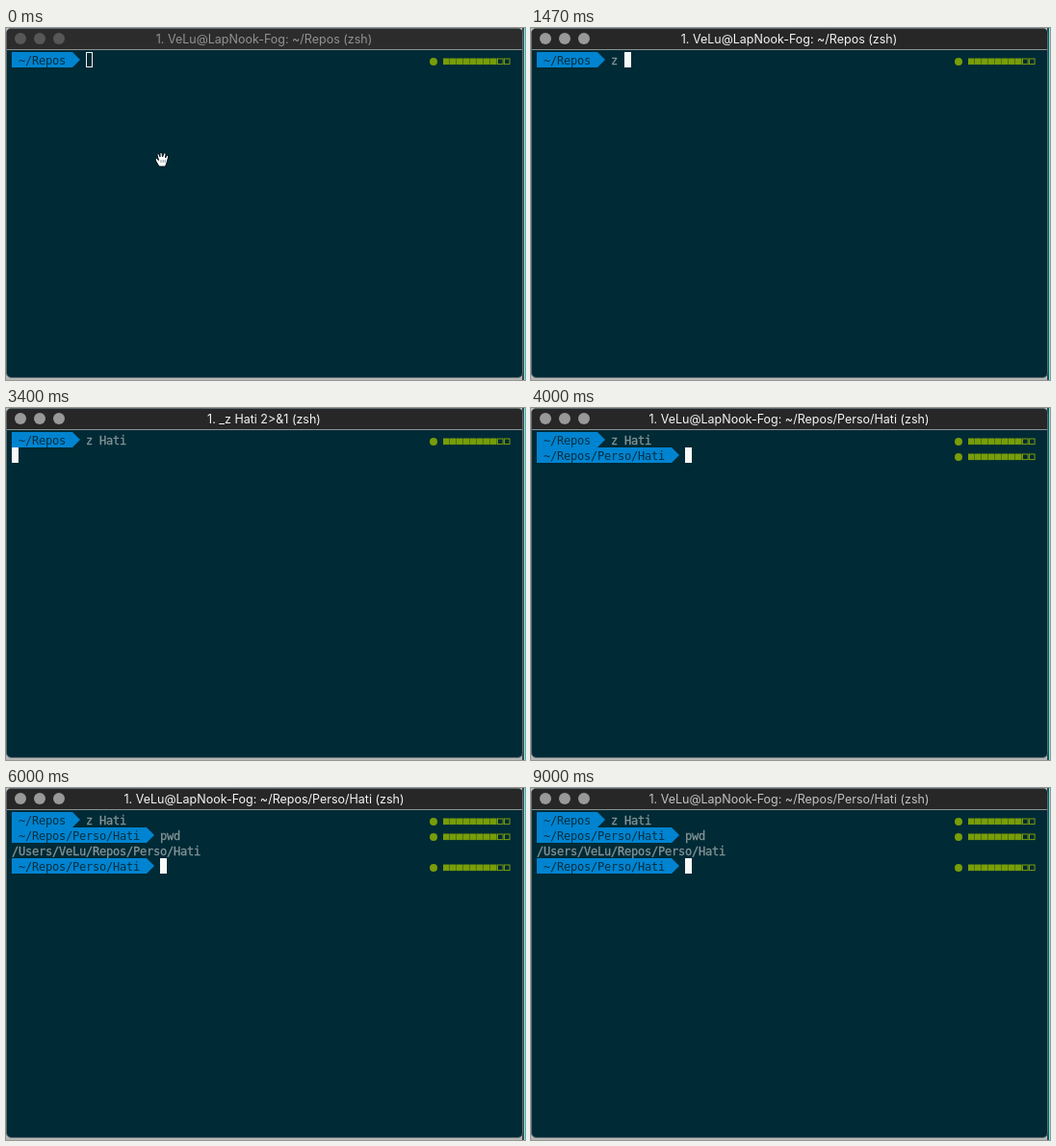
An HTML page that plays this animation: 539x366 px, repeating every 9190 ms.

```html
<!DOCTYPE html>
<html lang="en">
<head>
<meta charset="utf-8">
<title>Terminal</title>
<style>
html, body { margin: 0; width: 100%; height: 100%; overflow: hidden; background: #b4b6b6; }
svg { display: block; width: 100%; height: 100%; }
text { white-space: pre; }
.mono { font: 12px "DejaVu Sans Mono", monospace; letter-spacing: -0.224px; }
.plain { fill: #839496; stroke: #839496; stroke-width: 0.3; }
.title { font: 12.5px Inter, sans-serif; text-anchor: middle; }
</style>
</head>
<body>
<svg id="stage" viewBox="0 0 539 366"></svg>
<script>
const LOOP = 9190;
const CELL = 7, LINE = 16, LEFT = 6, TOP = 25;
const USER = 'VeLu', HOST = 'LapNook-Fog';
const HOME = '~/Repos', PROJECT = '~/Repos/Perso/Hati';
const stage = document.getElementById('stage');

function add(tag, attrs, parent = stage) {
  const el = document.createElementNS('http://www.w3.org/2000/svg', tag);
  set(el, attrs);
  parent.appendChild(el);
  return el;
}
function set(el, attrs) {
  for (const key in attrs) el.setAttribute(key, attrs[key]);
}
function show(el, on) {
  el.style.display = on ? '' : 'none';
}
const colX = col => LEFT + col * CELL;
const rowY = row => TOP + row * LINE;

function write(col, row, content, cls, fill) {
  const el = add('text', { x: colX(col), y: rowY(row) + 13, class: 'mono ' + cls });
  if (fill) el.setAttribute('fill', fill);
  el.textContent = content;
  return el;
}

// Window frame
add('rect', { x: 536, y: 0, width: 3, height: 366, fill: '#39474b' });
add('rect', { x: 538, y: 0, width: 1, height: 366, fill: '#5ff4f4' });
add('rect', { x: 0.5, y: 0.5, width: 536, height: 363, rx: 5, fill: '#002a35', stroke: '#59686c' });
const bar = add('path', { d: 'M1 22V5Q1 1 5 1H532Q536 1 536 5V22Z' });
add('rect', { x: 1, y: 22, width: 535, height: 1, fill: '#8b9393' });
const buttons = [15, 35, 55].map(cx => add('circle', { cx, cy: 11, r: 6 }));
const title = add('text', { x: 268, y: 16, class: 'title' });

function prompt(row, path) {
  const g = add('g', {});
  const y = rowY(row), end = colX(path.length + 2);
  add('path', { d: `M${LEFT} ${y}H${end}L${end + 8} ${y + 8}L${end} ${y + 16}H${LEFT}Z`, fill: '#0084d1' }, g);
  g.appendChild(write(1, row, path, '', '#002f3f'));
  add('circle', { cx: 444, cy: y + 10, r: 4, fill: '#789d08' }, g);
  for (let i = 0; i < 10; i++) {
    add('rect', {
      x: 454.5 + i * CELL, y: y + 7, width: 5.6, height: 5.6,
      fill: i < 8 ? '#789d08' : 'none', stroke: '#789d08'
    }, g);
  }
  return g;
}

const lines = [
  { at: 0, el: prompt(0, HOME) },
  { at: 3600, el: prompt(1, PROJECT) },
  { at: 5070, el: write(0, 2, `/Users/${USER}/Repos/Perso/Hati`, 'plain') },
  { at: 5200, el: prompt(3, PROJECT) }
];

function command(row, path, content, times) {
  const col = path.length + 4;
  return { row, col, content, times, el: write(col, row, '', 'plain') };
}
const commands = [
  command(0, HOME, 'z Hati', [1270, 1470, 1870, 2530, 2670, 2800]),
  command(1, PROJECT, 'pwd', [4400, 4670, 4800])
];
const caret = add('rect', {});

// Mouse pointers, drawn around their centre
const beam = add('g', { fill: 'none', 'stroke-linecap': 'round' });
for (const [stroke, width] of [['#001a21', 2.4], ['#fff', 1.1]]) {
  add('path', { d: 'M-3 -7Q0 -7 0 -5V5Q0 7 -3 7M3 -7Q0 -7 0 -5M0 5Q0 7 3 7M-1.5 2H1.5', stroke, 'stroke-width': width }, beam);
}
const arrow = add('path', {
  d: 'M0 -7V6L3 3L5 8L7 7L5 2.5H9Z', fill: '#000', stroke: '#fff'
});
const hand = add('g', { transform: 'translate(162 136)', 'stroke-linejoin': 'round' });
add('path', {
  d: 'M-3 8L-6.5 2Q-7.5 -.5 -5.5 -.5L-3.5 1.5L-5 -4Q-5 -6 -3.5 -5.5L-2 -2L-2 -6Q-1.2 -8 0 -6L.6 -2L2 -6Q3.5 -7 4 -5L3.5 -1L5.2 -3.5Q7 -4 6.6 -2L5 4L3.5 8Z',
  fill: '#fff', stroke: '#001216', 'stroke-width': 1
}, hand);
add('path', { d: 'M-1 4V1M1.2 4V1M3.2 4V1', stroke: '#456', 'stroke-width': 0.6 }, hand);

const pathTitle = path => `1. ${USER}@${HOST}: ${path} (zsh)`;
const titles = [
  [0, pathTitle(HOME)],
  [3400, '1. _z Hati 2>&1 (zsh)'],
  [3530, `1. ${USER}@${HOST}: ${PROJECT} (zsh)`],
  [5000, '1. pwd (zsh)'],
  [5130, pathTitle(PROJECT)]
];
const titleInk = [[0, '#929292'], [130, '#f4f4f4'], [8670, '#dcdcdc'], [8730, '#c2c2c2']];
const home = HOME.length + 4, project = PROJECT.length + 4;
// Caret positions: time, column, row
const carets = [
  [0, home, 0], [3400, 0, 1], [3600, project, 1],
  [5000, 0, 2], [5070, 0, 3], [5200, project, 3]
];
const latest = (list, t) => list.filter(item => item[0] <= t).pop();

function pointerAt(t) {
  if (t < 1200) return [162, 136];
  const step = Math.floor((t - 7600 + 1) * 15 / 1000);
  const p = Math.min(1, Math.max(0, step / 9));
  const u = p * p * (3 - 2 * p), v = 1 - u;
  const curve = (a, b, c, d) => v * v * v * a + 3 * v * v * u * b + 3 * v * u * u * c + u * u * u * d;
  return [curve(182, 200, 330, 355), curve(140, 300, 250, -8)];
}

function render(t) {
  const focused = t >= 130;
  set(bar, { fill: focused ? '#272727' : '#2c2c2c' });
  buttons.forEach(b => set(b, { fill: focused ? '#999' : '#575757' }));
  title.textContent = latest(titles, t)[1];
  set(title, { fill: latest(titleInk, t)[1] });

  lines.forEach(line => show(line.el, t >= line.at));
  let [, col, row] = latest(carets, t);
  for (const c of commands) {
    const count = c.times.filter(at => at <= t).length;
    c.el.textContent = c.content.slice(0, count);
    if (c.row === row && c.col === col) col += count;
  }
  const inset = focused ? 0 : 0.5;
  set(caret, {
    x: colX(col) + inset, y: rowY(row) + inset,
    width: CELL - 2 * inset, height: LINE - 2 * inset,
    fill: focused ? '#f8f9f9' : 'none', stroke: focused ? 'none' : '#f0f3f3'
  });

  const [x, y] = pointerAt(t);
  const moving = t >= 7600 && t < 8270;
  const place = { transform: `translate(${x} ${y})` };
  set(beam, place);
  set(arrow, place);
  show(hand, t < 200);
  show(beam, (t >= 200 && t < 1200) || (moving && y > 22));
  show(arrow, moving && y <= 22);
}

const start = performance.now();
function tick() {
  render((performance.now() - start) % LOOP);
  requestAnimationFrame(tick);
}
tick();
</script>
</body>
</html>
```
